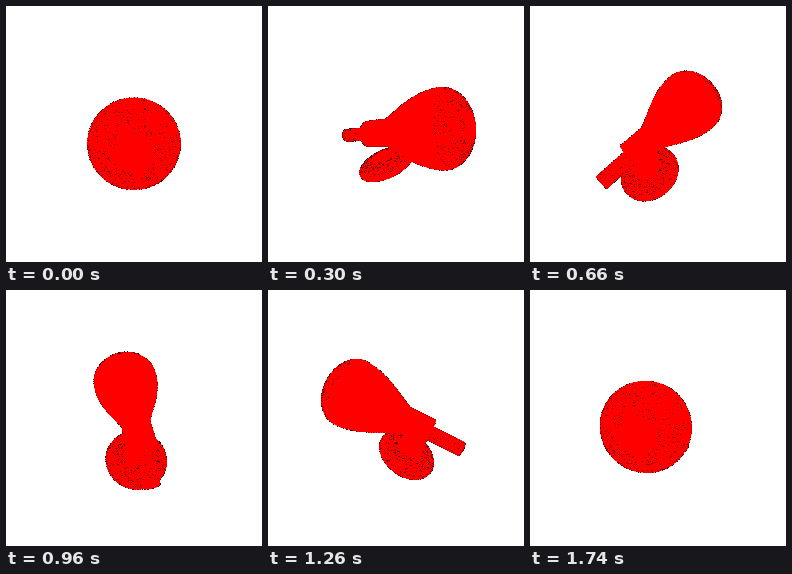
Write an HTML page that moves like this. It is 256 by 256 pixels and loops after 1800 ms.

```html
<!DOCTYPE html>
<html lang="en">
<head>
<meta charset="utf-8">
<title>Rotating solid</title>
<style>
  html, body { margin: 0; width: 100%; height: 100%; overflow: hidden; background: #fff; }
  svg { display: block; width: 100vw; height: 100vh; }
</style>
</head>
<body>
<svg id="stage" viewBox="0 0 256 256" shape-rendering="crispEdges"></svg>
<script>
const LOOP = 1800, STEP = 60, SIDES = 40;
const RAD = Math.PI / 180;
const PITCH = 31 * RAD, DISTANCE = 215, CENTER_X = 128, CENTER_Y = 124.8;
const stage = document.getElementById('stage');

let seed = 7;
const random = () => (seed = seed * 16807 % 2147483647) / 2147483647;

const curve = (count, fn) => Array.from({ length: count + 1 }, (_, i) => fn(i / count));
const cylinder = (from, to, r) => [[from, 0], [from, r], [to, r], [to, 0]];

// Profiles are [position along axis, radius].
const back = curve(14, k => [-10 + 61 * k, 14 + 21.5 * Math.sin(k * Math.PI / 2) ** 1.15]);
const front = curve(12, k => {
  const a = k * Math.PI / 2;
  return [51 + 25 * Math.sin(a), 35.5 * Math.cos(a)];
});
const disc = curve(20, k => [-10.5 * Math.cos(k * Math.PI), 32.3 * Math.sin(k * Math.PI)]);

function addPath(attributes) {
  const path = document.createElementNS('http://www.w3.org/2000/svg', 'path');
  for (const name in attributes) path.setAttribute(name, attributes[name]);
  return stage.appendChild(path);
}

// Dots are spread over the profile between the indices lo and hi.
function makePart(profile, tilt, y, z, dotCount, lo, hi) {
  const dots = Array.from({ length: dotCount }, () =>
    [lo + (hi - lo) * random(), random() * 2 * Math.PI]);
  return { profile, sin: Math.sin(tilt * RAD), cos: Math.cos(tilt * RAD), y, z, dots };
}

const parts = [
  makePart(disc, 115, -46, -13, 300, 11, 17),
  makePart(cylinder(-72, -36, 7.2), 20.5, -1.3, 0, 70, 1, 2),
  makePart(cylinder(-37, -4, 14), 20.5, -1.3, 0, 0, 1, 2),
  makePart(back.concat(front.slice(1)), 20.5, -1.3, 0, 320, 16, 23)
];

for (const part of parts) {
  part.outline = addPath({ fill: 'none', stroke: '#000', 'stroke-width': 1.2, 'stroke-dasharray': '1 1.3' });
}
for (const part of parts) {
  part.body = addPath({ fill: '#f00', stroke: '#f00', 'stroke-width': 0.4 });
  part.speckles = addPath({ fill: '#600' });
}

function project(part, [u, r], around, turn) {
  const px = r * Math.cos(around), q = r * Math.sin(around);
  const py = part.y + u * part.sin + q * part.cos;
  const pz = part.z + u * part.cos - q * part.sin;
  const x = px * Math.cos(turn) + pz * Math.sin(turn);
  const z = pz * Math.cos(turn) - px * Math.sin(turn);
  const up = py * Math.cos(PITCH) - z * Math.sin(PITCH);
  const depth = py * Math.sin(PITCH) + z * Math.cos(PITCH);
  const scale = DISTANCE / (DISTANCE - depth);
  return [CENTER_X + x * scale, CENTER_Y - up * scale];
}

const facing = (a, b, c, d) =>
  (c[0] - a[0]) * (d[1] - b[1]) - (c[1] - a[1]) * (d[0] - b[0]) > 0;

function bodyPath(part, turn) {
  const rings = part.profile.map(point =>
    curve(SIDES, k => project(part, point, k * 2 * Math.PI, turn)));
  let d = '';
  for (let i = 0; i < rings.length - 1; i++) {
    for (let j = 0; j < SIDES; j++) {
      const quad = [rings[i][j], rings[i + 1][j], rings[i + 1][j + 1], rings[i][j + 1]];
      if (facing(...quad)) d += 'M' + quad.map(p => p.map(v => v.toFixed(2))).join('L') + 'Z';
    }
  }
  return d;
}

function specklePath(part, turn) {
  let d = '';
  for (const [index, around] of part.dots) {
    const i = Math.floor(index), k = index - i;
    const a = part.profile[i], b = part.profile[i + 1];
    const at = (f, angle) =>
      project(part, [a[0] + (b[0] - a[0]) * f, a[1] + (b[1] - a[1]) * f], angle, turn);
    const p = at(k, around);
    if (facing(p, at(k + 0.05, around), at(k + 0.05, around + 0.02), at(k, around + 0.02))) {
      d += `M${Math.floor(p[0])} ${Math.floor(p[1])}h1v1h-1z`;
    }
  }
  return d;
}

let shown = -1;
function draw(time) {
  const step = Math.floor(time % LOOP / STEP);
  if (step !== shown) {
    shown = step;
    const turn = step * STEP / LOOP * 2 * Math.PI;
    for (const part of parts) {
      const d = bodyPath(part, turn);
      part.outline.setAttribute('d', d);
      part.body.setAttribute('d', d);
      part.speckles.setAttribute('d', specklePath(part, turn));
    }
  }
}

const start = performance.now();
function tick() {
  draw(performance.now() - start);
  requestAnimationFrame(tick);
}
tick();
</script>
</body>
</html>
```
